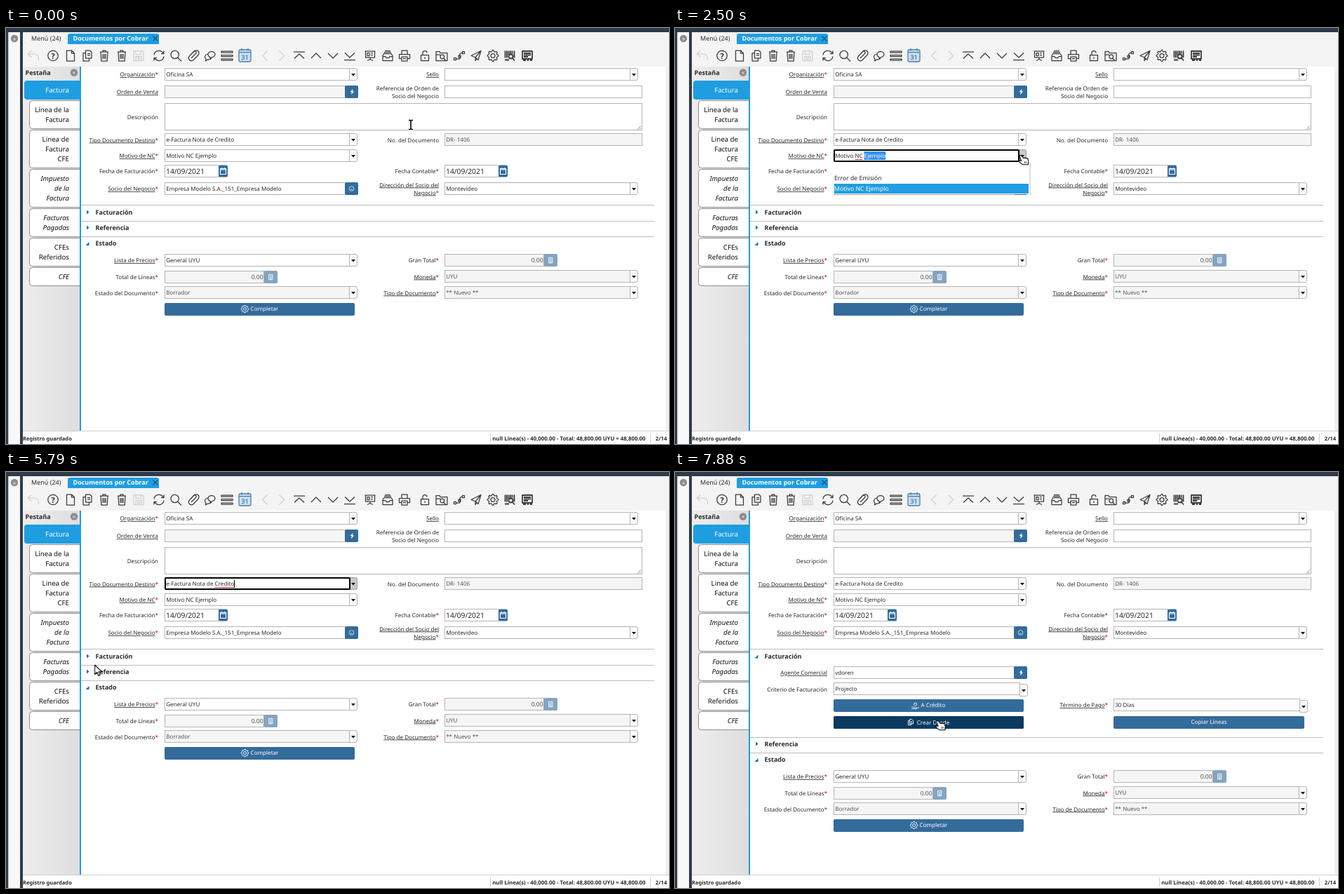
Animation, 945 px wide and 593 px high, one loop 8 s. Source, as an HTML page:

```html
<!DOCTYPE html>
<html lang="es">
<head>
<meta charset="utf-8">
<title>Documentos por Cobrar</title>
<style>
html, body { margin: 0; width: 100%; height: 100%; overflow: hidden; background: #fff; }
svg { display: block; width: 945px; height: 593px; font: 8.05px "Noto Sans", "Open Sans", sans-serif;
  fill: #2a2a2a; text-rendering: geometricPrecision; }
text { white-space: pre; }
.u { text-decoration: underline; }
.req { fill: #e00000; }
.icon { fill: none; stroke: #3a3a3a; stroke-width: 1.25; stroke-linejoin: round; }
.thick { stroke-width: 1.8; }
.off { stroke: #cfcfcf; }
.w { fill: none; stroke: #fff; stroke-width: .9; }
.cur { fill: #fff; stroke: #000; stroke-width: 1.1; stroke-linejoin: round; }
</style>
</head>
<body>
<svg id="stage" viewBox="0 0 945 593"></svg>
<script>
const LOOP = 8000, BLUE = '#336b9b', SKY = '#1f9de1', DARK = '#0a3a60', EDGE = '#b4b4b4';

// ---- drawing helpers ----
const rect = (x, y, w, h, fill, more = '') =>
  `<rect x="${x}" y="${y}" width="${w}" height="${h}" fill="${fill}" ${more}/>`;
const text = (x, y, s, more = '') => `<text x="${x}" y="${y}" ${more}>${s}</text>`;
const path = (d, more = '') => `<path d="${d}" ${more}/>`;
const group = (id, ...parts) => `<g id="${id}">${parts.join('')}</g>`;
const at = (x, y, s) => `<g transform="translate(${x} ${y})">${s}</g>`;
const END = 'text-anchor="end"', MID = 'text-anchor="middle"', BOLD = 'font-weight="700"';

// flags: u = underlined, r = required
function label(x, cy, s, flags = '') {
  const star = flags.includes('r') ? '<tspan class="req">*</tspan>' : '';
  return text(x, cy + 3, `<tspan class="${flags.includes('u') ? 'u' : ''}">${s}</tspan>${star}`, END);
}
const box = (x, y, w, h, gray) =>
  rect(x + .5, y + .5, w - 1, h - 1, gray ? '#f5f5f5' : '#fff', `stroke="${EDGE}"`);
const value = (x, cy, s, gray) => text(x + 2.2, cy + 3, s, gray ? 'fill="#555"' : '');
const input = (x, cy, w, s = '', gray) => box(x, cy - 9, w, 18, gray) + value(x, cy, s, gray);
const caretDown = (x, cy) => path(`M${x} ${cy - 1}h6l-3 3.4z`, 'fill="#111"');

function select(x, cy, s, gray, w = 263, dy = 0) {
  const bx = x + w, y = cy - 9 + dy;
  return input(x, cy, w + 1, s, gray) +
    path(`M${bx + .5} ${y + .5}h8.5q2.5 0 2.5 2.5v12q0 2.5-2.5 2.5h-8.5z`, `fill="#fafafa" stroke="${EDGE}"`) +
    caretDown(bx + 3, cy + dy);
}
const focused = (x, cy, s) =>
  rect(x + 262.5, cy - 8.5, 12, 17, '#c9c9c9', 'rx="2" stroke="#a0a0a0"') + caretDown(x + 266, cy) +
  rect(x + 1, cy - 8, 263, 16, '#fff', 'rx="1" stroke="#000" stroke-width="2"') + value(x, cy, s);

const GLYPH = {
  zoom: path('M2-4l-4 4h2.2l-.6 4 4.2-4.4h-2.3z', 'fill="#fff"'),
  person: '<g class="w" stroke-opacity=".75"><circle r="3.4"/>' + path('M-1.6-1h.2M1.4-1h.2M-1.6 1.8q1.6-1.6 3.2 0') + '</g>',
  calc: path('M-2.6-3.6h5.2v7.4h-5.2zM-1.5-1.4h3M-1.5.6h3M-1.5 2.4h3', 'class="w"'),
  date: path('M-4-3.5h8v8h-8zM-4-2h8M-2-5v2M2-5v2', 'class="w" style="stroke-width:1.1"'),
};
const side = (x, cy, w, glyph, fill = BLUE, h = 18) =>
  rect(x, cy - h / 2, w, h, fill, 'rx="2"') + at(x + w / 2, cy, GLYPH[glyph]);
const lookup = (cy, s, glyph, gray) => input(226, cy, 258, s, gray) + side(483, cy, 19, glyph);
const dateBox = (x, cy) => box(x, cy - 9, 78, 18) +
  text(x + 2, cy + 4, '14/09/2021', 'font-size="10.3"') + side(x + 77, cy, 13, 'date', BLUE, 17);
const amount = (x, cy) => box(x, cy - 9, 142, 18, true) +
  text(x + 140.5, cy + 3, '0.00', `${END} font-size="8.5" fill="#555"`) + side(x + 141.5, cy, 19.5, 'calc', '#84a4c1');
const button = (x, y, s, fill = BLUE, w = 271, shift = 6.5) => rect(x, y, w, 18, fill, 'rx="2"') +
  text(x + w / 2 + shift, y + 11, s, `${MID} fill="#fff"`);
const rule = y => rect(107, y, 817, 1, '#bdbdbd');
const head = (cy, s) => text(127.5, cy + 3.2, s, `${BOLD} font-size="9"`);
const closed = cy => path(`M115 ${cy - 3}l3.6 3-3.6 3z`, 'fill="#1d6fb4"');
const open = cy => path(`M118.5 ${cy - 2}v5h-5z`, 'fill="#1d6fb4"');

// ---- window frame ----
const gear = r => {
  let d = '';
  for (let i = 0; i < 32; i++) {
    const a = (i - .5) / 32 * 2 * Math.PI, k = i % 4 < 2 ? r : r * .78;
    d += `${i ? 'L' : 'M'}${(k * Math.cos(a)).toFixed(2)} ${(k * Math.sin(a)).toFixed(2)}`;
  }
  return `${d}zM${-r * .38} 0a${r * .38} ${r * .38} 0 1 0 ${r * .76} 0a${r * .38} ${r * .38} 0 1 0 ${-r * .76} 0`;
};
const BIN = 'M-6-5.5h12M-2-5.5v-2h4v2M-5-5.5l.8 13h8.4l.8-13M-2-2.5v7M0-2.5v7M2-2.5v7';
const ICONS = {
  92: 'M-5.5-7.5h7l4 4v11h-11zM1.5-7.5v4h4',
  116: 'M-2.5-7.5h6l2.5 2.5v8.5h-8.5zM-2.5-4h-3.5v11.5h8.5v-4M0-3h4M0-.5h4',
  140: BIN, 165: BIN,
  218: 'M-7-1a7 7 0 0 1 12-4l2 2M7-7v4h-4M7 1a7 7 0 0 1-12 4l-2-2M-7 7v-4h4',
  242: 'M-7-1.5a5.7 5.7 0 1 0 11.4 0a5.7 5.7 0 1 0-11.4 0M3 3l5 5',
  267: 'M-3 3.5L3.5-3q1.5-2-.2-3t-3 .3L-5.5.5q-2.5 3 0 5.5t5.5.2L7-1q2-3.5 0-5.5t-5.5-.5L-3-2',
  291: 'M-3-1.5a5 4 0 1 1 6 3.5l-3 2v-2q-3-1-3-3.5M-3-2.5q-4.5 1-4.5 4 0 2 1.5 3l-.5 3 3-2q4 .5 5.5-2',
  315: 'M-8-6.5h16v2h-16zM-8-1h16v2h-16zM-8 4.5h16v2h-16z',
  418: 'M-8-5.5h16M-7 4L0-2.5 7 4', 442: 'M-7 3.5L0-3.5 7 3.5',
  466: 'M-7-3.5L0 3.5 7-3.5', 490: 'M-8 6h16M-7-4L0 2.5 7-4',
  519: 'M-7.5-6.5h15M-6.5-6.5v9h13v-9M0 2.5v3M-4 7l4-2 4 2M-4-4h3v4h-3zM1-4h3M1-1h3',
  544: 'M-7 0l2-3h10l2 3v7h-14zM-7 1h4l1 2h4l1-2h4M-5-5h10M-4-7h8',
  568: 'M-4-2v-5.5h8v5.5M-4 4h-3.5v-6h15v6h-3.5M-4 1.5h8v6h-8zM-2 4h4',
  597: 'M-5.5-1h11v8h-11zM-3-1v-3a3 3 0 0 1 6 0M0 2v2.5',
  621: 'M-8-6h5l1 2h10v11h-16zM-8-1.5h6M-2 1.5a2.8 2.8 0 1 0 5.6 0a2.8 2.8 0 1 0-5.6 0M3 4l3 3',
  646: 'M-7.5 3h3v3h-3zM4.5-6h3v3h-3zM-4.5 4.5h4.5q2 0 1-3.5t1.5-5h2M-1-.5h3v3h-3z',
  670: 'M-7 0L7-7 3 6-1 2.5zM-1 2.5L7-7M-1 2.5v4.5l2.2-2.6',
  694: gear(7.8),
};
const HEAVY_ICONS = {
  718: 'M-6.5-7v10M-4-7v10M-1.5-7v6M1-7v4M3.5-7v4M6.5-7v10M-7 6h6M-1.5 1a3 3 0 1 0 6 0a3 3 0 1 0-6 0M4 3.5l3 3.5',
  743: 'M-7-6.5h14v11h-14zM-5-3.5h10M-5-1h10M-5 1.5h6M-6 6.5h4M0 6.5h2M4 6.5h3',
};
const GRAY_ICONS = {
  39: 'M-8-2.5h9q7 0 6.5 9M-8-2.5l5-4.5M-8-2.5l5 4.5',
  189: 'M-7-7h12l2 2v12h-14zM-4-7v5h7v-5M-4 7v-6h8v6M-2 3h4M-2 5h4',
  369: 'M3.5-7L-3.5 0 3.5 7', 393: 'M-3.5-7L3.5 0-3.5 7',
};
const icons = (set, css) => Object.entries(set).map(([x, d]) => at(x, 39.5, path(d, `class="icon ${css}"`))).join('');
const collapse = (x, y, s) => `<circle cx="${x}" cy="${y}" r="5.2" fill="#8c8c8c"/>` +
  text(x, y + 2.8, s, `${MID} fill="#fff" font-size="8"`);

const TABS = [
  [104, ['Línea de la', 'Factura']], [146, ['Linea de', 'Factura', 'CFE']],
  [202, ['Impuesto', 'de la', 'Factura'], 1], [258, ['Facturas', 'Pagadas'], 1],
  [300, ['CFEs', 'Referidos']], [342, ['CFE'], 1],
];
const tab = ([y, lines, italic]) =>
  path(`M105 ${y - .5}H37.5q-4 0-4 4v${14 * lines.length + 4}q0 4 4 4H105`, 'fill="#fff" stroke="#8e8e8e"') +
  lines.map((s, i) => text(90, y + 16 + 14 * i, s, `${END} font-size="9.7" fill="#111" ${italic ? 'font-style="italic"' : ''}`)).join('');

const chrome = [
  '<defs><linearGradient id="shade"><stop offset="0" stop-color="#ededed"/><stop offset="1" stop-color="#dedede"/></linearGradient></defs>',
  rect(0, 0, 945, 593, '#fff'),
  rect(0, 0, 945, 6, '#2f3b48'), rect(0, 0, 3.5, 593, '#2f3b48'), rect(3.5, 6, 16.5, 587, '#f8f8f8'),
  rect(20, 0, 4, 593, '#2f3b48'), collapse(12, 15, '»'),
  rect(24, 6, 921, 49, '#f4f4f4'),
  text(36, 18, 'Menú (24)', 'font-size="9"'),
  path('M88 23V11q0-3 3-3h124q3 0 3 3v12z', `fill="${SKY}"`),
  text(95.5, 18, 'Documentos por Cobrar', `${BOLD} font-size="9" fill="#fff"`),
  path('M209.5 11.5l7 7M216.5 11.5l-7 7', 'stroke="#1d4f7c" stroke-width="1.2"'),
  icons(ICONS, ''), icons(HEAVY_ICONS, 'thick'), icons(GRAY_ICONS, 'off'),
  '<circle cx="67" cy="39.5" r="7.2" class="icon"/>', text(67, 43.5, '?', `${MID} ${BOLD} font-size="11"`),
  rect(332, 31, 17, 17, '#c9e0f3', 'rx="2" stroke="#4a7fae" stroke-width="1.3"'),
  rect(332, 34, 17, 1.3, '#4a7fae'), path('M336 29v3.5M345 29v3.5', 'stroke="#4a7fae" stroke-width="1.3"'),
  text(340.5, 45, '31', `${MID} font-size="9" fill="#234f78"`),
  rect(24, 55, 81, 519, 'url(#shade)'), rect(105, 55, 2, 519, SKY),
  text(27.5, 66.5, 'Pestaña', `${BOLD} font-size="9"`), collapse(97, 63.5, '«'),
  path('M106 75H30q-4 0-4 4v19q0 4 4 4h76z', `fill="${SKY}"`),
  text(90, 92, 'Factura', `${END} font-size="9.7" fill="#fff"`), ...TABS.map(tab),
  rect(940, 55, 5, 519, '#f1f1f1'), rect(24, 574, 921, 1, '#cfcfcf'),
  text(24, 588, 'Registro guardado', `${BOLD} font-size="7.55"`),
  rect(690, 578, 1, 13, '#ccc'), rect(918, 578, 1, 13, '#ccc'),
  text(911.5, 588, 'null Línea(s) - 40,000.00 - Total: 48,800.00 UYU = 48,800.00', `${END} ${BOLD} font-size="7.8"`),
  text(942, 588, '2/14', `${END} ${BOLD} font-size="7.6"`),
];

// ---- form ----
const L = 217, R = 617, LX = 226, RX = 625;
const form = [
  label(L, 66, 'Organización', 'ur'), select(LX, 66, 'Oficina SA'),
  label(R, 66, 'Sello', 'u'), select(RX, 66, '', false, 264),
  label(L, 91, 'Orden de Venta', 'u'), lookup(91, '', 'zoom', true),
  label(R, 86, 'Referencia de Orden de'), label(R, 97, 'Socio del Negocio'), input(RX, 91, 282),
  label(L, 127, 'Descripción'), box(LX, 107, 681, 39),
  path('M900 144.5l5-5M903 144.5l2-2', 'stroke="#777" stroke-width=".9"'),
  label(L, 159.5, 'Tipo Documento Destino', 'ur'), select(LX, 159, 'e-Factura Nota de Credito'),
  label(R, 159.5, 'No. del Documento'), input(RX, 159, 282, 'DR- 1406', true),
  label(L, 182, 'Motivo de NC', 'ur'), select(LX, 182, 'Motivo NC Ejemplo'),
  label(L, 204, 'Fecha de Facturación', 'r'), dateBox(LX, 204),
  label(R, 204, 'Fecha Contable', 'r'), dateBox(RX, 204),
  label(L, 229, 'Socio del Negocio', 'ur'), lookup(229, 'Empresa Modelo S.A._151_Empresa Modelo', 'person'),
  label(R, 223.5, 'Dirección del Socio del', 'u'), label(R, 234.5, 'Negocio', 'ur'), select(RX, 229, 'Montevideo', false, 264),
  rule(252), head(262.5, 'Facturación'),
  group('shut', closed(262.5)),
];
const billing = group('billing', open(262.5),
  label(L, 286, 'Agente Comercial', 'u'), lookup(286, 'vdoren', 'zoom'),
  label(L, 309.5, 'Criterio de Facturación'), select(LX, 309, 'Projecto', false, 265, 2),
  button(LX, 324, 'A Crédito'),
  at(342, 333, path('M-5 2h3l2 1h3M-5 4.5h7l4-2.5M-1.5-2a2 2 0 1 0 4 0a2 2 0 1 0-4 0', 'class="w"')),
  label(R, 332, 'Término de Pago', 'ur'), select(RX, 332, '30 Días', false, 265, 2),
  button(LX, 348, ''), group('hover', button(LX, 348, '', DARK)), group('press', button(LX, 348, '', '#123f66')),
  text(368, 359.5, 'Crear Desde', `${MID} fill="#fff"`),
  at(336, 356.5, path('M-1.5-4h3l2 2v4.5h-5zM-1.5-2h-2v6.2h4v-1.7M0-1h2M0 .8h2', 'class="w"')),
  button(RX, 348, 'Copiar Líneas', BLUE, 272, 0));
const lower = group('lower',
  rule(275), closed(284.5), head(284.5, 'Referencia'), rule(297), open(307), head(307, 'Estado'),
  label(L, 331, 'Lista de Precios', 'ur'), select(LX, 331, 'General UYU'),
  label(R, 331, 'Gran Total', 'r'), amount(RX, 331),
  label(L, 354.5, 'Total de Líneas', 'r'), amount(LX, 355),
  label(R, 354.5, 'Moneda', 'ur'), select(RX, 354, 'UYU', true, 264),
  label(L, 377.5, 'Estado del Documento', 'r'), select(LX, 377, 'Borrador', true),
  label(R, 377.5, 'Tipo de Documento', 'ur'), select(RX, 377, '** Nuevo **', true, 264),
  button(LX, 392, 'Completar', BLUE, 271, 7), at(340.5, 400.5, path(gear(5.3), 'class="w"')));

// ---- focus states, list and pointer ----
const reason = group('reason', focused(LX, 182, 'Motivo NC'),
  rect(256.5, 187, 11, 1, '#e03030'), rect(269.5, 176, 30.7, 12, '#3390f0'),
  text(269.7, 185, 'Ejemplo', 'fill="#fff"'));
const kind = group('kind', focused(LX, 159, 'e-Factura Nota de Credito'), rect(297.5, 164, 28, 1, '#e03030'),
  group('caret', rect(325, 154, 1, 11, '#000')));
const list = group('list', rect(226, 191, 281, 47, '#000', 'opacity=".12" rx="1"'), rect(226, 191, 279, 46, '#fff'),
  text(227, 217, 'Error de Emisión', 'font-size="8.7"'), rect(227, 222, 277, 14, '#219de3'),
  text(227, 232, 'Motivo NC Ejemplo', 'font-size="8.7" fill="#fff"'));
const BEAM = 'M-3-6.5h2q1 0 1 1 0-1 1-1h2M0-5.5v11M-3 6.5h2q1 0 1-1 0 1 1 1h2';
const HAND = 'M-6-6q1.2-1.5 2.6 0l3 3.5q1-.8 2 0 1.2-.8 2.2.2 1.3-.6 2 .6 1.6 3.5.6 6v2.5h-8l-4.6-4q-1-2 1-2l1.7.6z';
const pointer = group('pointer',
  group('beam', path(BEAM, 'fill="none" stroke="#fff" stroke-width="3.4"'), path(BEAM, 'fill="none" stroke="#000" stroke-width="1.6"')),
  group('arrow', path('M0 0v13.5l3.2-3 2.2 5 2.3-1-2.2-4.8h4.5z', 'class="cur"')),
  group('hand', path(HAND, 'class="cur"'), path('M1.5 2v3M3.5 2v3', 'stroke="#000" stroke-width=".7"')));

document.getElementById('stage').innerHTML =
  [...chrome, ...form, billing, lower, reason, kind, list, pointer].join('');

// ---- timing ----
const css = [];
function track(id, prop, keys, ease = 'step-end') {
  const all = [...keys, [LOOP, keys[keys.length - 1][1]]];
  css.push(`@keyframes ${id}{${all.map(([t, v]) => `${t / LOOP * 100}%{${prop}:${v}}`).join('')}}`,
    `#${id}{animation:${id} ${LOOP}ms ${ease} infinite}`);
}
// alternates shown and hidden at the given times
const show = (id, ...times) => {
  const keys = times.map((t, i) => [t, i % 2 ? 0 : 1]);
  track(id, 'opacity', times[0] ? [[0, 0], ...keys] : keys);
};
show('shut', 0, 6290);
show('billing', 6290);
show('hover', 7300);
show('press', 7790, 7880);
show('reason', 2210, 4290);
show('kind', 4290, 6210);
show('caret', 4290, 4830, 5330, 5920);
show('beam', 0, 2290, 3420, 4900);
show('hand', 2290, 3420, 6040, 6900, 7300);
show('arrow', 4900, 6040, 6900, 7300);
track('lower', 'transform', [[0, 'translateY(0)'], [6290, 'translateY(103px)']]);
track('list', 'clip-path', [[0, 'inset(0 0 100% 0)'], [2500, 'inset(0)'], [3040, 'inset(0 0 50% 0)'], [3170, 'inset(0 0 100% 0)']]);

const STOPS = [
  [0, 577, 138], [419, 577, 138], [420, 576, 140], [600, 576, 140], [760, 490, 117], [960, 330, 150],
  [1140, 231, 190], [1250, 250, 202], [1380, 281, 188], [2289, 281, 188], [2290, 497, 188],
  [3250, 497, 188], [3330, 504, 186], [3420, 470, 183], [3750, 381, 177], [3999, 381, 177], [4000, 377.5, 165.5],
  [4750, 377.5, 165.5], [4900, 412, 210], [5040, 406, 250], [5170, 374, 268], [5250, 374, 268],
  [5420, 265, 296], [5580, 155, 288], [5700, 126.5, 275], [5919, 126.5, 275], [6040, 116, 265],
  [6750, 116, 265], [6940, 190, 290], [7160, 310, 335], [7380, 378.5, 361],
];
track('pointer', 'transform', STOPS.map(([t, x, y]) => [t, `translate(${x}px,${y}px)`]), 'linear');
document.head.appendChild(document.createElement('style')).textContent = css.join('\n');
</script>
</body>
</html>
```
